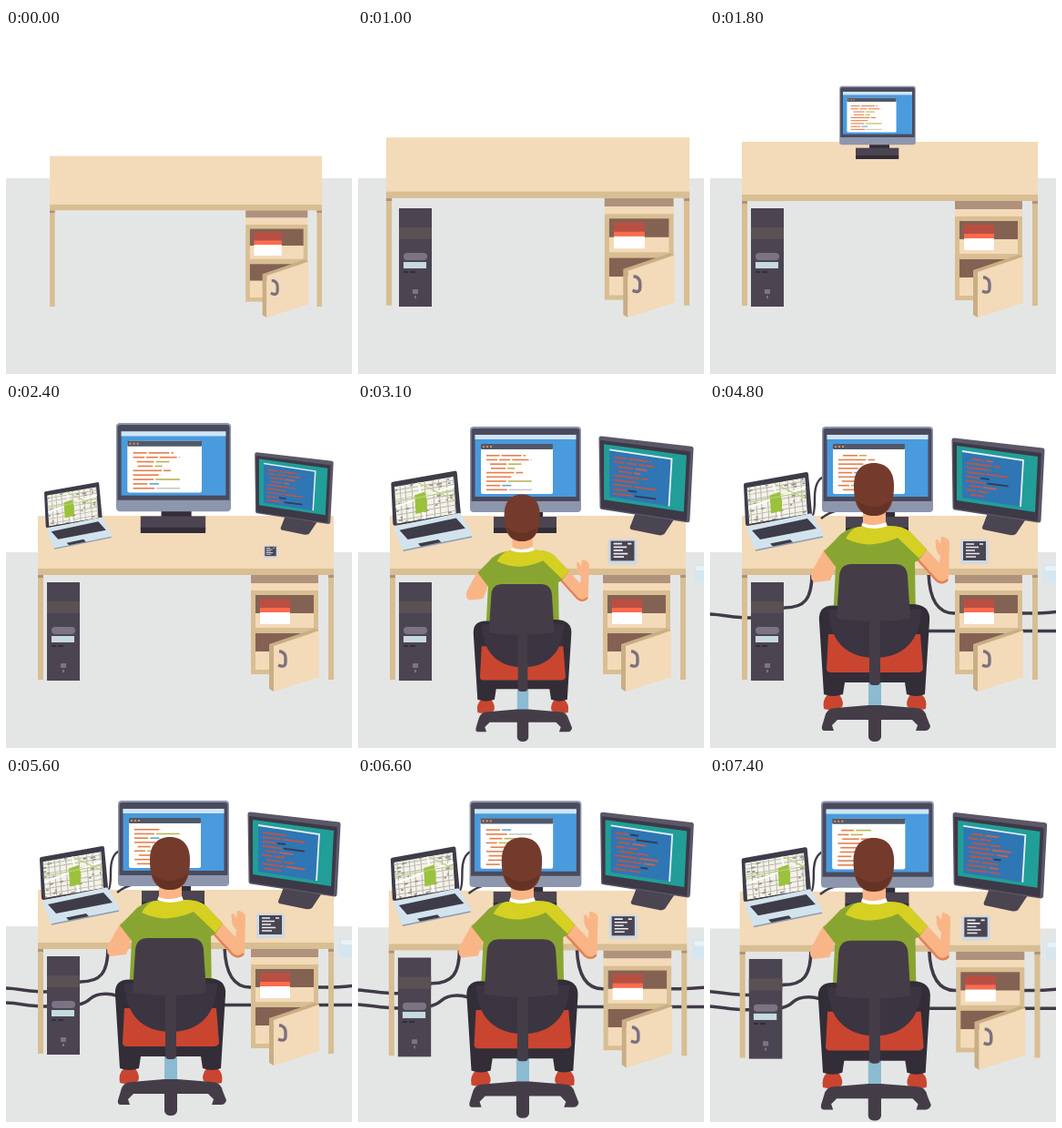
An HTML page that plays this animation: 380 px wide and 380 px high, repeating every 7.5 s.

```html
<!DOCTYPE html>
<html lang="en">
<head>
<meta charset="utf-8">
<title>Programmer at a desk</title>
<style>
html, body { margin: 0; width: 100%; height: 100%; overflow: hidden; background: #fff; }
svg { display: block; width: 100vw; height: 100vh; }
.cable { fill: none; stroke: #403a47; stroke-width: 3.5; }
.thin { stroke-width: 2.4; }
.wood { fill: #f3dab8; }
.edge { fill: #d8be92; }
.hollow { fill: #846253; }
.dark { fill: #4b4451; }
.chair { fill: #443d47; }
.shade { fill: #3a3540; }
.deep { fill: #332d38; }
.grey { fill: #7c7484; }
.skin { fill: #fab587; }
.red { fill: #c94530; }
</style>
</head>
<body>
<svg viewBox="0 0 380 380">
<defs>
  <clipPath id="mapClip"><rect width="64" height="40"/></clipPath>
</defs>
<g id="scene">
  <rect x="-10" y="165" width="400" height="220" fill="#e4e6e5"/>

  <g id="sides">
    <rect x="366" y="178" width="40" height="21" rx="2" fill="#d5e6ee"/>
    <rect x="368" y="180" width="38" height="5" fill="#e8f2f6"/>
  </g>
  <rect id="sliver" x="-4" y="224" width="5" height="56" fill="#d5e6ee"/>

  <path class="cable thin" pathLength="1" data-from="3300" data-to="3800" d="M125 82Q115 86 115 105T112 125"/>
  <path class="cable" pathLength="1" data-from="3400" data-to="3950" d="M240 188C241 215 249 232 268 232H352Q366 232 384 230"/>
  <path class="cable" pathLength="1" data-from="3700" data-to="4800" d="M112 188C112 216 104 226 82 226C66 228 62 237 44 237S12 233 -4 233"/>
  <path class="cable" pathLength="1" data-from="3600" data-to="5500" d="M384 251.500H240C180 252 150 252 131 247C118 236 100 238 92 245C88 249 84 250 80 251L44 253C24 253 14 249 -4 249"/>

  <g id="desk">
    <path class="edge" d="M35 190h6v115h-6zM354 190h6v115h-6z"/>
    <path fill="#b0917c" d="M35 190h6v3h-6zM354 190h6v3h-6zM269 190h74v9h-74z"/>
    <rect class="wood" x="269" y="199" width="74" height="8"/>
    <rect class="edge" x="269" y="207" width="74" height="92"/>
    <path class="wood" d="M274 212h64v36h-64zM274 254h64v40h-64z"/>
    <path class="hollow" d="M274 212h64v20h-64zM274 254h64v20h-64z"/>
    <rect x="279" y="216" width="33" height="10" fill="#b94f43"/>
    <rect x="279" y="226" width="33" height="5" fill="#ff6a4d"/>
    <rect x="279" y="231" width="33" height="13" fill="#fff"/>
    <path fill="#c9ad85" d="M289 266L339 249L344 251L294 269V318L289 315Z"/>
    <path class="wood" d="M294 268L344 251V302L294 318Z"/>
    <path d="M300 274h2q5 2 5 7v5q0 5-5 4l-3-1" fill="none" stroke="#7c7080" stroke-width="3.4"/>
    <rect class="wood" x="35" y="125" width="325" height="58"/>
    <rect class="edge" x="35" y="183" width="325" height="7"/>
  </g>

  <g id="tower">
    <rect class="dark" x="45" y="198" width="36" height="108"/>
    <rect x="45" y="219" width="36" height="13" fill="#595154"/>
    <rect class="grey" x="50" y="247" width="26" height="8" rx="4"/>
    <rect x="50" y="257" width="25" height="7" fill="#c6dae2"/>
    <path class="deep" d="M50 267h5v2h-5zM57 267h6v2h-6z"/>
    <path class="grey" d="M60 287h6v5h-6zM62 294h2v3h-2z"/>
  </g>

  <path class="cable thin" pathLength="1" data-from="3300" data-to="3800" d="M142 119Q132 120 122 128"/>

  <g id="monitor">
    <rect x="171" y="118" width="32" height="10" class="deep"/>
    <rect class="dark" x="149" y="126" width="69" height="13"/>
    <rect class="deep" x="149" y="138" width="69" height="6"/>
    <rect x="123" y="27" width="122" height="94" rx="4" fill="#8d96ac"/>
    <path fill="#4b4a5c" d="M124.500 109V32q0-3 3-3h113q3 0 3 3v77z"/>
    <rect x="128.500" y="36" width="111" height="68" fill="#4a9ade"/>
    <rect x="128.500" y="36" width="111" height="5" fill="#cfe5f3"/>
    <rect x="135" y="46" width="79" height="55" rx="2" fill="#fff"/>
    <rect x="135" y="46" width="79" height="6" rx="1" fill="#50586a"/>
    <path fill="#f08a4b" d="M137 48h2v2h-2zM141 48h2v2h-2zM145 48h2v2h-2z"/>
    <g id="mainCode" transform="translate(141 58)"></g>
  </g>

  <g id="laptop">
    <path d="M39 91L106 79L110 122L41 134Z" fill="#3e3c49" stroke="#3e3c49" stroke-width="4" stroke-linejoin="round"/>
    <g transform="matrix(1 -.17 .065 1 40.500 94)" clip-path="url(#mapClip)">
      <rect width="64" height="40" fill="#f4f2e8"/>
      <g id="map"></g>
    </g>
    <path d="M43 139L110 125L122 146L51 160Z" fill="#d3e3ee" stroke="#d3e3ee" stroke-width="5" stroke-linejoin="round"/>
    <path d="M50 163L124 148" stroke="#8b9db0" stroke-width="1.500"/>
    <path fill="#3e3c49" d="M46 141L107 128L117 139L55 151ZM66 155.500L88 151L91 154L69 158.500Z"/>
  </g>

  <g id="side">
    <path class="dark" d="M305 122L346 130L336 145Q333 147 329 146L300 140Q298 138 300 135Z"/>
    <path d="M268 42L365 53L361 130L269 116Z" fill="#5b5768" stroke="#5b5768" stroke-width="5" stroke-linejoin="round"/>
    <path d="M268 45L363 57L359 130L269 116Z" fill="#3d3946" stroke="#3d3946" stroke-width="2" stroke-linejoin="round"/>
    <path d="M271 48L360 60L357 121L271 108Z" fill="#219e98"/>
    <path d="M277 54L344 64L341 115L277 105Z" fill="#2f76b4"/>
    <path d="M277 54L344 64L341 115" fill="none" stroke="#e6eff5" stroke-width="1.800"/>
    <g id="sideCode" transform="matrix(1 .13 -.03 1 282 61)"></g>
  </g>

  <g id="phone">
    <rect x="275" y="151" width="31" height="27" rx="2" fill="#cdd9e3"/>
    <rect x="278" y="153" width="25" height="21" class="dark"/>
    <path d="M281 156h9M281 159.500h14M281 163h10M281 166.500h15M281 170h11M296 156h4" stroke="#e9eef2" stroke-width="1.600"/>
  </g>

  <g id="man">
    <path class="skin" d="M126 161L138 178Q136 187 132 196L115 198Q109 195 112 186Z"/>
    <path class="skin" d="M227 173L237 161L252 177L253 169Q247 163 248 156Q246 151 250 151L253 156L254 148Q260 148 263 153L262 195Q255 203 248 197Z"/>
    <path d="M228 173L249 196Q256 201 261 195" fill="none" stroke="#e08358" stroke-width="2.500"/>
    <path fill="#89a531" d="M164 137Q147 139 139 150L125 164L138 181L135 240H226L225 176L230 173L238 162L219 142Q211 136 197 136Z"/>
    <path fill="#d6d022" d="M163 137Q155 139 149 150Q166 158 181 156T206 149L230 172L238 162L219 142Q211 136 197 136Z"/>
    <path d="M167 134Q181 139 194 134" fill="none" stroke="#fff" stroke-width="5"/>
    <path class="skin" d="M168 114H193V132Q181 138 168 133Z"/>
    <path fill="#743b2d" d="M180 67C194 67 202 76 202 92C202 112 197 125 180 125S158 112 158 92C158 76 166 67 180 67Z"/>
    <path fill="#653226" d="M161 108Q180 122 199 108Q194 125 180 125T161 108Z"/>

    <path fill="#8bbbd1" d="M174 304h14v34h-14z"/>
    <path class="red" d="M125 337Q123 326 130 321H142Q148 330 145 335Q135 340 125 337ZM237 337Q239 326 232 321H220Q214 330 217 335Q227 340 237 337Z"/>
    <path class="deep" d="M141 224Q118 221 120 241L125 321Q135 325 146 321L148 308H214L216 321Q227 325 236 321L241 241Q243 221 219 222Z"/>
    <path class="red" d="M130 255H231L234 293Q233 297 228 297H133Q128 297 128 293Z"/>
    <path class="shade" d="M130 228C131 262 150 281 181 281S231 262 232 228Z"/>
    <path class="chair" d="M156 178H203Q216 178 217 191L220 238Q180 244 139 238L142 191Q143 178 156 178Z"/>
    <rect class="chair" x="175" y="240" width="12" height="71" rx="4"/>
    <path class="chair" d="M138 336L174 333H188L226 336Q236 336 238 346L242 356Q241 361 236 361H226L228 355L222 349H188V368Q187 373 181 373T174 368V349H140L134 355L136 361H126Q122 361 123 356L126 346Q128 336 138 336Z"/>
  </g>
</g>
</svg>
<script>
const LOOP = 7500, STEP = 100;
const $ = id => document.getElementById(id);
const clamp = x => Math.min(1, Math.max(0, x));
const rand = n => { const x = Math.sin(n * 127.1 + 3.7) * 43758.5453; return x - Math.floor(x); };
const rect = (x, y, w, h, fill) => `<rect x="${x}" y="${y}" width="${w}" height="${h}" fill="${fill}"/>`;

// id, start, duration, overshoot, pivot x, pivot y
const pops = [
  ['desk', -582, 1842, 1.62, 197.5, 318],
  ['tower', 150, 800, .96, 63, 306],
  ['monitor', 1477, 1372, .96, 184, 144],
  ['laptop', 1938, 1400, 1, 70, 150],
  ['side', 1938, 1400, 1, 316, 143],
  ['phone', 2190, 1400, 1, 290.5, 164.5],
  ['man', 2685, 1406, 1.62, 181, 373]
];

function backOut(p, c) {
  const u = 1 - clamp(p);
  return 1 + c * u * u - (c + 1) * u * u * u;
}

function drawMap() {
  let s = '';
  for (let i = 0; i < 16; i++) {
    s += rect(-24 + i * 7 + rand(i) * 3, -20, 1, 80, '#b9b6ad');
    s += rect(-24, -20 + i * 5.5 + rand(i + 30) * 2, 112, .9, '#b9b6ad');
  }
  for (let i = 0; i < 90; i++)
    s += rect(-24 + rand(i + 60) * 105, -16 + rand(i + 160) * 72, 1.5 + rand(i) * 3, 1.8, '#95928b');
  s += '<path d="M-24 26L88 6M24 -20L32 60" stroke="#fff" stroke-width="2"/>';
  s += '<path d="M21 13L32 11L34 21L33 32L21 33Z" fill="#9bc23c"/>';
  s += '<path d="M-24 17L88 15M10 -10L70 30" stroke="#bccf82" stroke-width="1.200"/>';
  $('map').innerHTML = s;
}

// Rows advance as typing goes on; the last row grows until it is full.
function drawCode(id, typed, rows, gap, width, thick, colors) {
  const first = Math.floor(typed);
  let s = '';
  for (let i = 0; i < rows; i++) {
    const k = first + i, share = i == rows - 1 ? typed - first || 1 : 1;
    let x = rand(k) < .6 ? 0 : 5 * rand(k + 9);
    const end = width * (.5 + .5 * rand(k + 40)) * share;
    for (let j = 0; x < end && j < 4; j++) {
      const w = Math.min(end - x, width * (.22 + .35 * rand(k * 5 + j)));
      s += rect(x, i * gap, w, thick, colors[j && Math.floor(rand(k * 3 + j + 70) * colors.length)]);
      x += w + 2;
    }
  }
  $(id).innerHTML = s;
}

function draw(t) {
  const zoom = 1 + .0094 * Math.max(0, t - 5800) / 1000;
  $('scene').setAttribute('transform', `translate(${190 - 190 * zoom} 0) scale(${zoom})`);

  for (const [id, start, length, over, x, y] of pops) {
    const k = backOut((t - start) / length, over);
    $(id).setAttribute('transform', `translate(${x} ${y}) scale(${k}) translate(${-x} ${-y})`);
    $(id).style.display = t > start ? '' : 'none';
  }

  const slide = backOut((t - 2800) / 1000, .96);
  $('sides').setAttribute('transform', `translate(${18 * (1 - slide)} 0)`);
  $('sliver').setAttribute('transform', `translate(${-4 * (1 - slide)} 0)`);

  document.querySelectorAll('.cable').forEach(c => {
    const { from, to } = c.dataset, p = clamp((t - from) / (to - from));
    c.style.strokeDasharray = `${p} 2`;
    c.style.display = p ? '' : 'none';
  });

  const pan = 14 * clamp((t - 4000) / 3400);
  $('map').setAttribute('transform', `translate(${pan} ${-pan * .1})`);

  const typed = Math.max(0, t - 3300) / 420;
  drawCode('mainCode', typed, 9, 4.7, 54, 1.6, ['#e5804d', '#e5804d', '#b9b657', '#c8c8c8', '#6aa5cf']);
  drawCode('sideCode', typed, 9, 4.9, 50, 2, ['#b9564c', '#b9564c', '#c8604f', '#303f5c']);
}

function tick(now) {
  draw(Math.floor(now % LOOP / STEP) * STEP);
  requestAnimationFrame(tick);
}

drawMap();
draw(0);
requestAnimationFrame(tick);
</script>
</body>
</html>
```
